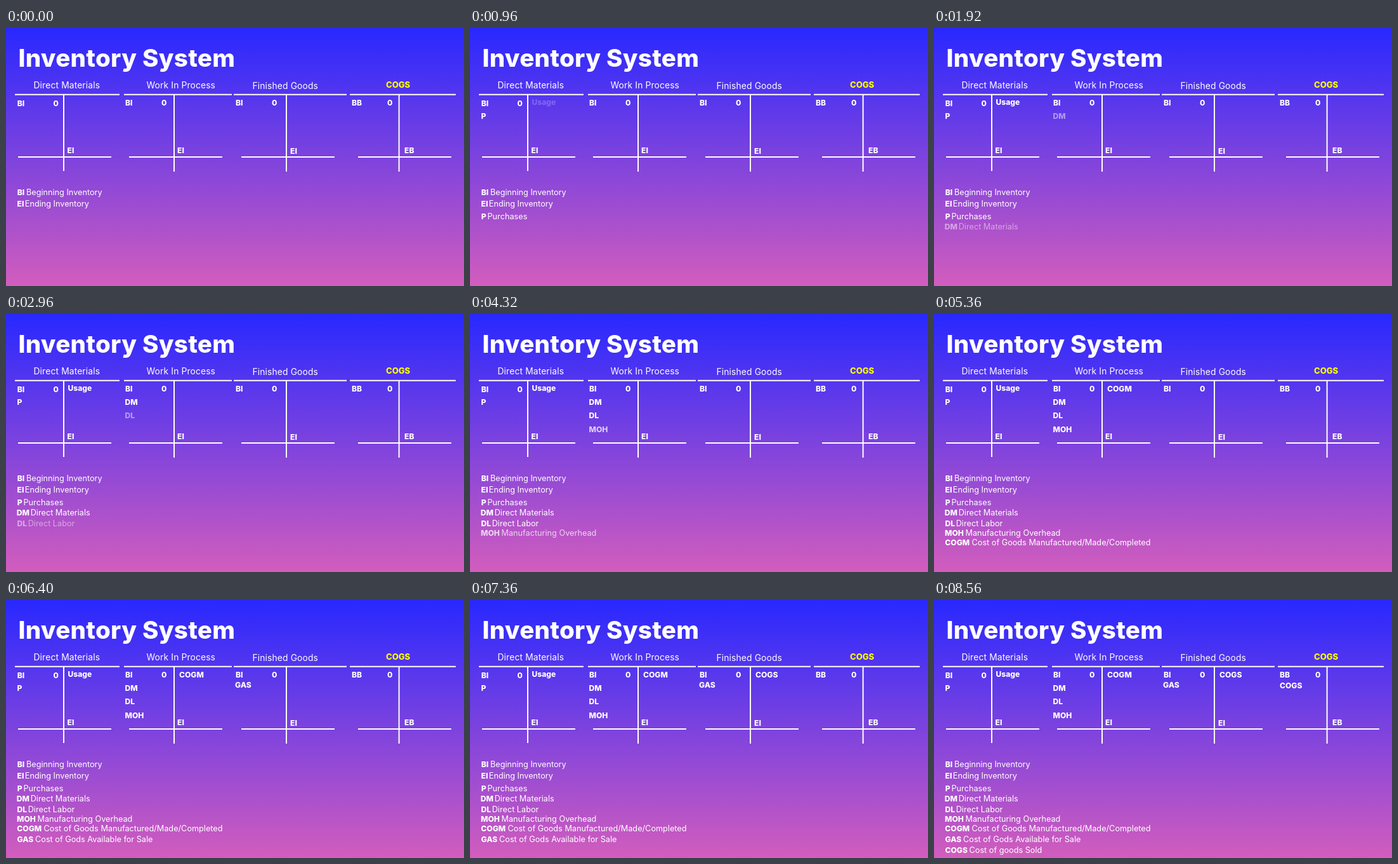
Write an HTML page that moves like this. It is 722 px wide and 406 px high and loops after 9920 ms.

```html
<!DOCTYPE html>
<html lang="en">
<head>
<meta charset="utf-8">
<title>Inventory System</title>
<style>
  html, body { margin: 0; width: 100%; height: 100%; overflow: hidden; background: #2828ff; }
  svg { display: block; width: 100vw; height: 100vh; }
  text { font: 400 12.7px Inter, "Open Sans", sans-serif; fill: #fff; white-space: pre; }
  .title { font-size: 38.5px; font-weight: 800; letter-spacing: .3px; }
  .heading { font-size: 13.8px; letter-spacing: .15px; }
  .total { font-size: 13px; font-weight: 800; fill: #ff0; }
  .entry, .code { font-size: 12.1px; font-weight: 800; }
  .rules { stroke: #fff; stroke-width: 2; fill: none; }
</style>
</head>
<body>
<svg viewBox="0 0 722 406">
  <defs>
    <linearGradient id="sky" x2="0" y2="1">
      <stop stop-color="#2828ff"/>
      <stop offset="1" stop-color="#d25dbd"/>
    </linearGradient>
  </defs>
  <rect width="722" height="406" fill="url(#sky)"/>

  <text class="title" x="19.5" y="61">Inventory System</text>
  <text class="heading" x="43.5" y="94.5">Direct Materials</text>
  <text class="heading" x="221.5" y="95.3">Work In Process</text>
  <text class="heading" x="388.5" y="95.5">Finished Goods</text>
  <text class="total" x="599" y="94.3">COGS</text>

  <path class="rules" d="M14 104.8H179M91 104V225M19 203H166"/>
  <path class="rules" d="M186 104.8H356M265 104V226M194 203H341"/>
  <path class="rules" d="M359 104.8H537M442 104V226M371 203H518"/>
  <path class="rules" d="M542 104.8H709M619.6 104V226M555 203H702"/>
  <g id="content"></g>
</svg>
<script>
const LOOP = 9920, FADE = 560;
const content = document.getElementById('content');

function add(parent, tag, attrs, label = '') {
  const node = document.createElementNS('http://www.w3.org/2000/svg', tag);
  for (const key in attrs) node.setAttribute(key, attrs[key]);
  node.textContent = label;
  return parent.appendChild(node);
}

const entry = (parent, label, x, y) => add(parent, 'text', { class: 'entry', x, y }, label);

function legend(parent, code, x, meaning, meaningX, y) {
  add(parent, 'text', { class: 'code', x, y }, code);
  add(parent, 'text', { x: meaningX, y }, meaning);
}

// A group that fades in at the given time and stays until the loop restarts.
function fadeIn(start) {
  const group = add(content, 'g', {});
  group.animate([
    { opacity: 0, offset: 0, easing: 'step-end' },
    { opacity: .1, offset: start / LOOP, easing: 'steps(7, jump-start)' },
    { opacity: 1, offset: (start + FADE) / LOOP },
    { opacity: 1, offset: 1 }
  ], { duration: LOOP, iterations: Infinity });
  return group;
}

entry(content, 'BI', 17.8, 123);
entry(content, '0', 74.5, 123);
entry(content, 'EI', 96.5, 196.8);
entry(content, 'BI', 188, 121.8);
entry(content, '0', 245, 121.8);
entry(content, 'EI', 270, 196.8);
entry(content, 'BI', 362, 121.8);
entry(content, '0', 419, 121.8);
entry(content, 'EI', 448, 197.8);
entry(content, 'BB', 545, 121.8);
entry(content, '0', 601, 121.8);
entry(content, 'EB', 628, 196.8);
legend(content, 'BI', 17.8, 'Beginning Inventory', 32, 263);
legend(content, 'EI', 17.5, 'Ending Inventory', 29.8, 281.3);

const purchases = fadeIn(320);
entry(purchases, 'P', 17.5, 142.5);
legend(purchases, 'P', 17.8, 'Purchases', 27.5, 300.5);

entry(fadeIn(960), 'Usage', 97.5, 121.4);

const materials = fadeIn(1760);
entry(materials, 'DM', 187.5, 143);
legend(materials, 'DM', 16.7, 'Direct Materials', 38.7, 317.3);

const labor = fadeIn(2800);
entry(labor, 'DL', 187.5, 164);
legend(labor, 'DL', 17.5, 'Direct Labor', 34.7, 333.5);

const overhead = fadeIn(4000);
entry(overhead, 'MOH', 187.5, 185.5);
legend(overhead, 'MOH', 17, 'Manufacturing Overhead', 49.5, 348.5);

const manufactured = fadeIn(4800);
entry(manufactured, 'COGM', 273, 121.6);
legend(manufactured, 'COGM', 17.3, 'Cost of Goods Manufactured/Made/Completed', 59.5, 364.3);

const available = fadeIn(5920);
entry(available, 'GAS', 361, 138);
legend(available, 'GAS', 17.5, 'Cost of Gods Available for Sale', 46, 381);

entry(fadeIn(6880), 'COGS', 450, 122);

const sold = fadeIn(7920);
entry(sold, 'COGS', 545, 138.5);
legend(sold, 'COGS', 17.5, 'Cost of goods Sold', 55.5, 398);
</script>
</body>
</html>
```
